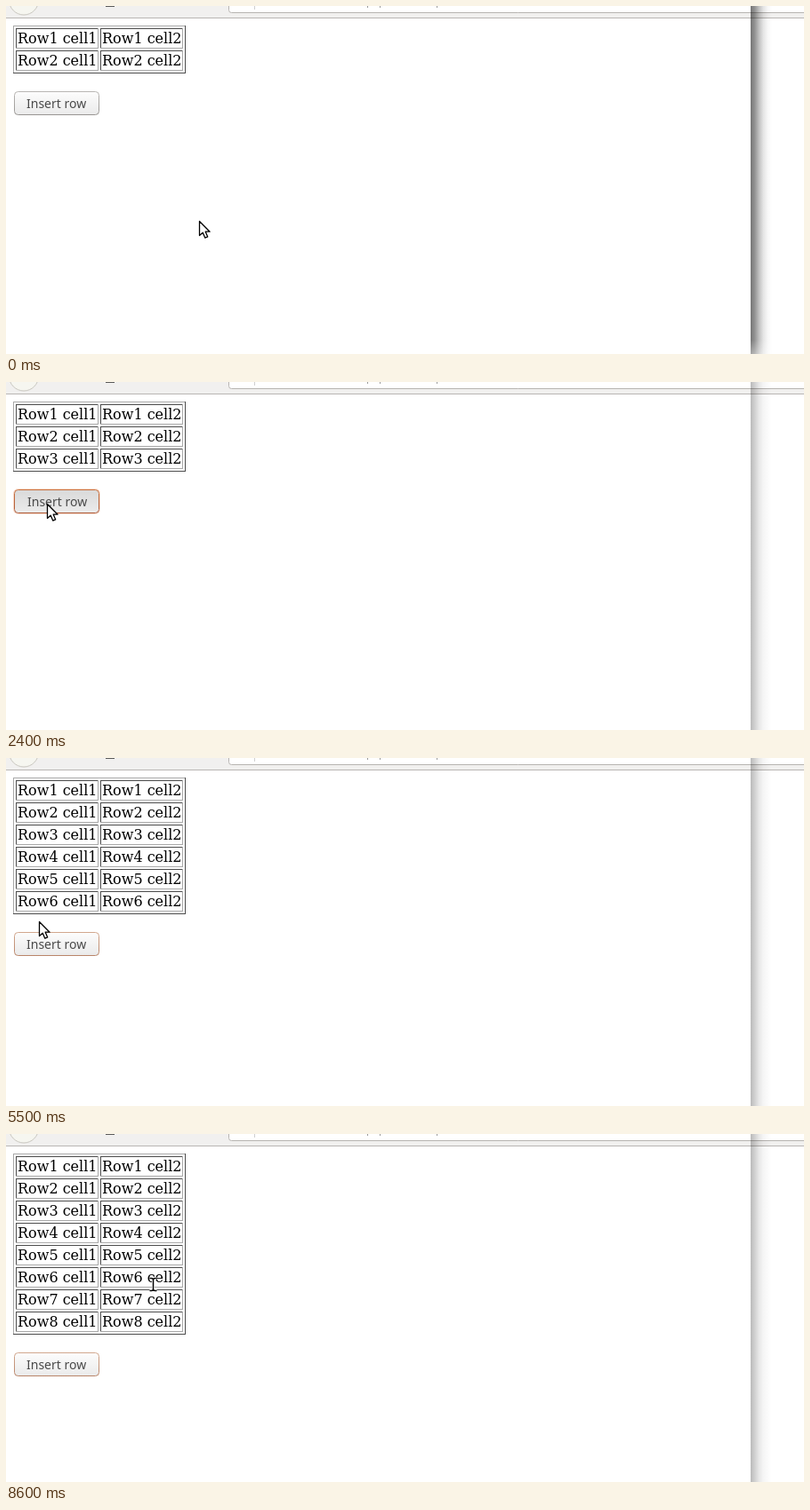
Write an HTML page with a canvas that moves like this. It is 897 px wide and 392 px high and loops after 10000 ms.

```html
<!DOCTYPE html>
<html lang="en">
<head>
<meta charset="utf-8">
<title>Insert row</title>
<style>
  html, body { margin: 0; width: 100%; height: 100%; overflow: hidden; background: #fff; }
  canvas { display: block; }
</style>
</head>
<body>
<canvas id="stage" width="897" height="392"></canvas>
<script>
const W = 897, H = 392, LOOP = 10000, STEP = 100;
const ctx = document.getElementById('stage').getContext('2d');

const insertTimes = [1400, 2600, 3800, 5500, 6500, 7300];
const presses = [[1300, 1400], [2400, 2600], [3600, 3800], [4800, 5500], [5900, 6500], [7100, 7300]];
const FOCUS_TIME = 1300;

// Pointer moves: start time, number of 100 ms steps, destination, shape
const moves = [
  [600, 4, 64, 98], [2100, 3, 46, 137], [3200, 3, 39, 158], [4500, 3, 37, 184],
  [5600, 2, 38, 209], [7000, 1, 37, 230], [7700, 1, 44, 244],
  [7800, 1, 114, 170, 'beam'], [7900, 1, 80, 80, 'beam'], [8000, 1, 39, 14],
  [8500, 1, 163, 9], [8600, 1, 165, 169, 'beam']
];

function pointerAt(t) {
  let x = 217, y = 242, shape = 'arrow';
  for (const [start, steps, toX, toY, toShape = 'arrow'] of moves) {
    if (t < start) break;
    const k = Math.min(1, (Math.floor((t - start) / STEP) + 1) / steps);
    x = Math.round(x + (toX - x) * k);
    y = Math.round(y + (toY - y) * k);
    shape = toShape;
  }
  return { x, y, shape };
}

function fill(color, x, y, w, h) {
  ctx.fillStyle = color;
  ctx.fillRect(x, y, w, h);
}

function roundRect(x, y, w, h, r) {
  ctx.beginPath();
  ctx.roundRect(x, y, w, h, r);
}

function gradient(x0, y0, x1, y1, stops) {
  const g = ctx.createLinearGradient(x0, y0, x1, y1);
  stops.forEach(([at, color]) => g.addColorStop(at, color));
  return g;
}

function text(str, x, y, font, color) {
  ctx.font = font;
  ctx.fillStyle = color;
  ctx.fillText(str, x, y);
}

function bevel(x, y, w, h, topLeft, bottomRight) {
  fill(bottomRight, x, y + h - 1, w, 1);
  fill(bottomRight, x + w - 1, y, 1, h);
  fill(topLeft, x, y, w - 1, 1);
  fill(topLeft, x, y, 1, h - 1);
}

function drawToolbar() {
  fill('#f1f0ef', 0, 0, W, 13);
  fill('#b9b6b3', 0, 13, W, 1);

  ctx.lineWidth = 1;
  ctx.beginPath();
  ctx.arc(20, -6.5, 16.5, 0, Math.PI * 2);
  ctx.fillStyle = '#f6f6f0';
  ctx.fill();
  ctx.strokeStyle = '#c9c7c0';
  ctx.stroke();

  roundRect(250.5, -10, W, 17.5, 3);
  ctx.fillStyle = '#fff';
  ctx.fill();
  ctx.strokeStyle = '#b7b4b1';
  ctx.stroke();

  fill('#5a5a5a', 112, 0, 10, 1);
  fill('#cfcfcf', 279, 0, 1, 4);
  for (const x of [406, 420, 484]) fill('#9a9a9a', x, 0, 1, 2);
}

function drawShadow(active) {
  const alphas = active ? [.54, .42, .24, .1, .03, 0] : [.27, .18, .09, .04, .015, 0];
  const stops = alphas.map((a, i) => [i / 5, `rgba(0,0,0,${a})`]);
  fill(gradient(837, 0, 861, 0, stops), 837, 0, 24, H);
  if (active) {
    const fade = [[0, 'rgba(255,255,255,0)'], [1, 'rgba(255,255,255,.35)']];
    fill(gradient(0, 376, 0, H, fade), 837, 376, 24, 16);
  }
}

function drawTable(rows) {
  const dark = '#4c4c4c', light = '#a9a9a9';
  bevel(8, 22, 194, 4 + rows * 25, light, dark);
  for (let row = 0; row < rows; row++) {
    for (let col = 0; col < 2; col++) {
      const x = 11 + col * 95, y = 25 + row * 25;
      bevel(x, y, 93, 23, dark, light);
      text(`Row${row + 1} cell${col + 1}`, x + 2, y + 17, '16px "DejaVu Serif", serif', '#000');
    }
  }
}

function drawButton(y, { pressed, hovered, focused }) {
  const face = pressed ? ['#d9d9d9', '#ececec'] : hovered ? ['#fff', '#f3f3f3'] : ['#fdfdfd', '#eaeaea'];
  const edge = pressed ? ['#c9713f', '#ad5a38']
    : focused ? (hovered ? ['#d9926b', '#bd6d47'] : ['#d2a88f', '#b98468'])
    : ['#b9b7b4', '#989592'];

  ctx.lineWidth = 1;
  if (focused && (hovered || pressed)) {
    roundRect(8.5, y - .5, 97, 28, 5);
    ctx.strokeStyle = 'rgba(235,140,90,.3)';
    ctx.stroke();
  }
  roundRect(9.5, y + .5, 95, 26, 4);
  ctx.fillStyle = gradient(0, y, 0, y + 27, [[0, face[0]], [1, face[1]]]);
  ctx.fill();
  ctx.strokeStyle = gradient(0, y, 0, y + 27, [[0, edge[0]], [1, edge[1]]]);
  ctx.stroke();
  text('Insert row', pressed ? 24 : 23, y + 19, '14px "Noto Sans", sans-serif', '#4a4a4a');
}

function drawPointer({ x, y, shape }) {
  ctx.save();
  ctx.translate(x + .5, y + .5);
  ctx.lineJoin = 'round';
  if (shape === 'beam') {
    const beam = new Path2D('M-4-7H-2Q0-7 0-5Q0-7 2-7H4M0-5V5M-4 7H-2Q0 7 0 5Q0 7 2 7H4');
    ctx.lineWidth = 3;
    ctx.strokeStyle = '#fff';
    ctx.stroke(beam);
    ctx.lineWidth = 1.5;
    ctx.strokeStyle = '#000';
    ctx.stroke(beam);
  } else {
    const arrow = new Path2D('M0 0V16L3.7 12.7L6.3 18.7L9.2 17.4L6.7 11.7H11.6Z');
    ctx.fillStyle = '#fff';
    ctx.fill(arrow);
    ctx.lineWidth = 1.3;
    ctx.strokeStyle = '#000';
    ctx.stroke(arrow);
  }
  ctx.restore();
}

function draw(t) {
  const rows = 2 + insertTimes.filter(time => t >= time).length;
  const buttonY = 46 + rows * 25;
  const pointer = pointerAt(t);
  const inside = pointer.x >= 9 && pointer.x < 105 && pointer.y >= buttonY && pointer.y < buttonY + 27;

  fill('#fff', 0, 0, W, H);
  drawToolbar();
  drawShadow(t < FOCUS_TIME);
  drawTable(rows);
  drawButton(buttonY, {
    pressed: presses.some(([down, up]) => t >= down && t < up),
    hovered: inside || (t >= 6700 && t < 7000),
    focused: t >= FOCUS_TIME
  });
  drawPointer(pointer);
}

const startTime = performance.now();
function tick() {
  draw((performance.now() - startTime) % LOOP);
  requestAnimationFrame(tick);
}
tick();
</script>
</body>
</html>
```
